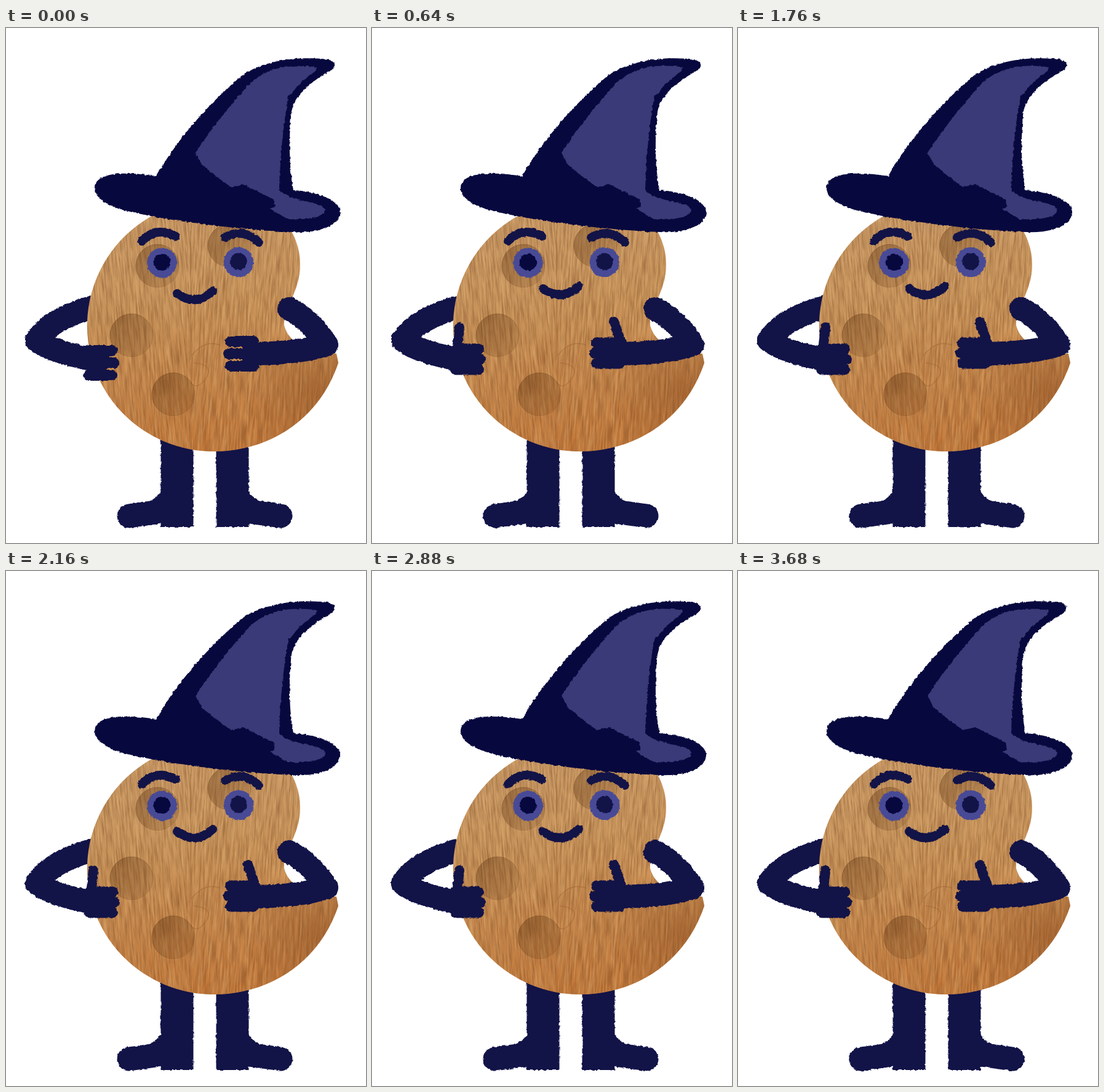
Recreate the animation shown at these times as an HTML page. Size 585 px wide and 838 px high, loop 3760 ms.

```html
<!DOCTYPE html>
<html lang="en">
<head>
<meta charset="utf-8">
<title>Wooden wizard</title>
<style>
  html, body { margin: 0; width: 100%; height: 100%; overflow: hidden; background: #fff; }
  svg { display: block; width: 100vw; height: 100vh; }
  .limb { fill: #121347; }
  .hat { fill: #07083e; }
  .shine { fill: #3a3a78; }
  .iris { fill: #484a96; }
  .line { fill: none; stroke: #121347; stroke-linecap: round; stroke-linejoin: round; }
  .arm { stroke-width: 38; }
  .leg { stroke-width: 53; stroke-linecap: butt; }
  .foot { stroke-width: 39; }
  .finger { stroke-width: 18; }
  .thumb { stroke-width: 16; }
  .face { stroke-width: 14; }
  .knot { fill: none; stroke: #7d4a1c; stroke-opacity: .25; stroke-width: 1.6; }
</style>
</head>
<body>
<svg viewBox="0 0 585 838">
  <defs>
    <filter id="rough" filterUnits="userSpaceOnUse" x="0" y="0" width="585" height="838" color-interpolation-filters="sRGB">
      <feTurbulence id="noise" type="fractalNoise" baseFrequency=".2" numOctaves="2" result="n"/>
      <feDisplacementMap in="SourceGraphic" in2="n" scale="4" xChannelSelector="R" yChannelSelector="G"/>
    </filter>
    <filter id="dark" x="0" y="0" width="1" height="1" color-interpolation-filters="sRGB">
      <feTurbulence type="fractalNoise" baseFrequency=".4 .025" numOctaves="3" seed="4"/>
      <feColorMatrix values="0 0 0 0 .45  0 0 0 0 .26  0 0 0 0 .12  1 0 0 0 -.37"/>
    </filter>
    <filter id="light" x="0" y="0" width="1" height="1" color-interpolation-filters="sRGB">
      <feTurbulence type="fractalNoise" baseFrequency=".25 .02" numOctaves="3" seed="9"/>
      <feColorMatrix values="0 0 0 0 .9  0 0 0 0 .72  0 0 0 0 .48  0 1 0 0 -.4"/>
    </filter>
    <linearGradient id="wood" x1="0" y1="0" x2=".15" y2="1">
      <stop offset="0" stop-color="#cb9d6b"/>
      <stop offset=".45" stop-color="#c9955c"/>
      <stop offset="1" stop-color="#c2783a"/>
    </linearGradient>
    <radialGradient id="shade" gradientUnits="userSpaceOnUse" cx="510" cy="600" r="120">
      <stop offset="0" stop-color="#7d431c" stop-opacity=".35"/>
      <stop offset="1" stop-color="#7d431c" stop-opacity="0"/>
    </radialGradient>
    <linearGradient id="pit" x1="0" y1="0" x2=".9" y2=".8">
      <stop offset="0" stop-color="#5b3210" stop-opacity=".42"/>
      <stop offset="1" stop-color="#5b3210" stop-opacity=".15"/>
    </linearGradient>
    <clipPath id="bodyClip">
      <path d="M336 280A205 204.5 0 1 0 338 689C425 689 508 640 540 545L537 530C500 525 462 520 452 484C450 455 478 430 478 385Q478 345 450 310Z"/>
    </clipPath>
    <clipPath id="leftHalf"><path d="M100 270H300V700H100Z"/></clipPath>
    <clipPath id="rightHalf"><path d="M300 270H560V700H300Z"/></clipPath>
  </defs>

  <g id="behind" filter="url(#rough)">
    <path class="line arm" d="M150 452Q75 470 50 508Q75 528 150 541"/>
  </g>

  <g clip-path="url(#bodyClip)">
    <path d="M120 270H550V700H120Z" fill="url(#wood)"/>
    <g clip-path="url(#leftHalf)"><g transform="rotate(-5 220 490)" id="grainLeft"></g></g>
    <g clip-path="url(#rightHalf)"><g transform="rotate(3 420 490)" id="grainRight"></g></g>
    <path class="knot" d="M300 330V540M305 545Q342 548 322 574Q308 590 300 576M300 535Q322 506 348 516"/>
    <path d="M120 270H550V700H120Z" fill="url(#shade)"/>
    <g id="pits"></g>
  </g>

  <g filter="url(#rough)">
    <path class="line arm" d="M50 508Q75 528 150 541"/>
    <path class="line arm" d="M460 457Q492 472 521 515Q480 529 400 530"/>
    <g id="fists"></g>
    <g id="thumbs">
      <path class="line thumb" d="M142 487L138 525M393 478L405 512"/>
    </g>
    <g id="eyes"></g>
    <path class="line face" d="M221 347Q243 322 276 339M356 341Q385 324 411 349"/>
    <path class="line face" id="mouth" d="M278 424Q308 446 336 420"/>
    <path class="hat" d="M244 241C282 175 335 118 385 76C425 50 480 46 523 51Q545 58 524 72C490 90 464 115 463 145C459 190 461 230 467 264C505 266 543 280 543 299C543 325 500 334 468 332C380 329 250 312 190 296C155 285 144 272 144 261C144 235 190 233 244 241Z"/>
    <path class="shine" d="M505 64C455 56 415 68 390 97C355 136 330 170 308 203L318 222Q345 245 366 259L385 254L435 279L437 291L429 294L458 311C485 312 519 310 519 295C510 280 465 285 444 264C446 200 452 150 459 110L466 106Q470 94 503 70Z"/>
  </g>
</svg>
<script>
const LOOP = 3760, BEAT = 160, POSE_CUT = 80, EXTRA_CUT = 2160;
const $ = id => document.getElementById(id);

function add(parent, tag, attrs) {
  const el = document.createElementNS("http://www.w3.org/2000/svg", tag);
  for (const key in attrs) el.setAttribute(key, attrs[key]);
  $(parent).appendChild(el);
}

// side is -1 for a foot pointing left, 1 for right
function leg(x, side) {
  const out = d => x + side * d;
  add("behind", "path", { class: "line leg", d: `M${x} 670V812` });
  add("behind", "path", { class: "line foot", d: `M${out(78)} 794L${out(28)} 787` });
  add("behind", "path", { class: "limb", d: `M${out(25)} 752Q${out(33)} 768 ${out(60)} 776H${x}Z` });
}

// Three stacked fingers, the middle one a little longer
function hand(parent, x, y, side, gap) {
  for (let i = -1; i <= 1; i++)
    add(parent, "path", {
      class: "line finger",
      d: `M${x - side * 20} ${y + i * gap}H${x + side * (i ? 17 : 20)}`
    });
}

function eye(x, y, pupil) {
  add("eyes", "circle", { class: "iris", cx: x, cy: y, r: 24.3 });
  add("eyes", "circle", { class: pupil, cx: x, cy: y - 1, r: 13.8 });
}

function pit(cx, cy) {
  add("pits", "circle", { cx, cy, r: 35, fill: "url(#pit)", stroke: "url(#pit)" });
}

for (const side of ["grainLeft", "grainRight"])
  for (const tone of ["light", "dark"])
    add(side, "rect", { x: 60, y: 250, width: 540, height: 470, filter: `url(#${tone})` });

pit(246, 387);
pit(204, 500);
pit(272, 596);
pit(363, 354);
leg(278, -1);
leg(368, 1);
hand("fists", 155, 545, 1, 20);
hand("fists", 382, 530, -1, 20);
hand("thumbs", 156, 539, 1, 16.5);
hand("thumbs", 382, 529, -1, 16.5);
eye(253.5, 382, "hat");
eye(378, 381, "limb");

let shown = -1;
function draw(now) {
  const t = now % LOOP;
  const step = Math.floor(t / BEAT) + (t >= POSE_CUT) + (t >= EXTRA_CUT);
  if (step !== shown) {
    shown = step;
    const up = t >= POSE_CUT;
    $("noise").setAttribute("seed", step * 7 + 1);
    $("fists").style.display = up ? "none" : "";
    $("thumbs").style.display = up ? "" : "none";
    $("mouth").setAttribute("transform", up ? "" : "translate(0 8)");
  }
  requestAnimationFrame(draw);
}
draw(performance.now());
</script>
</body>
</html>
```
